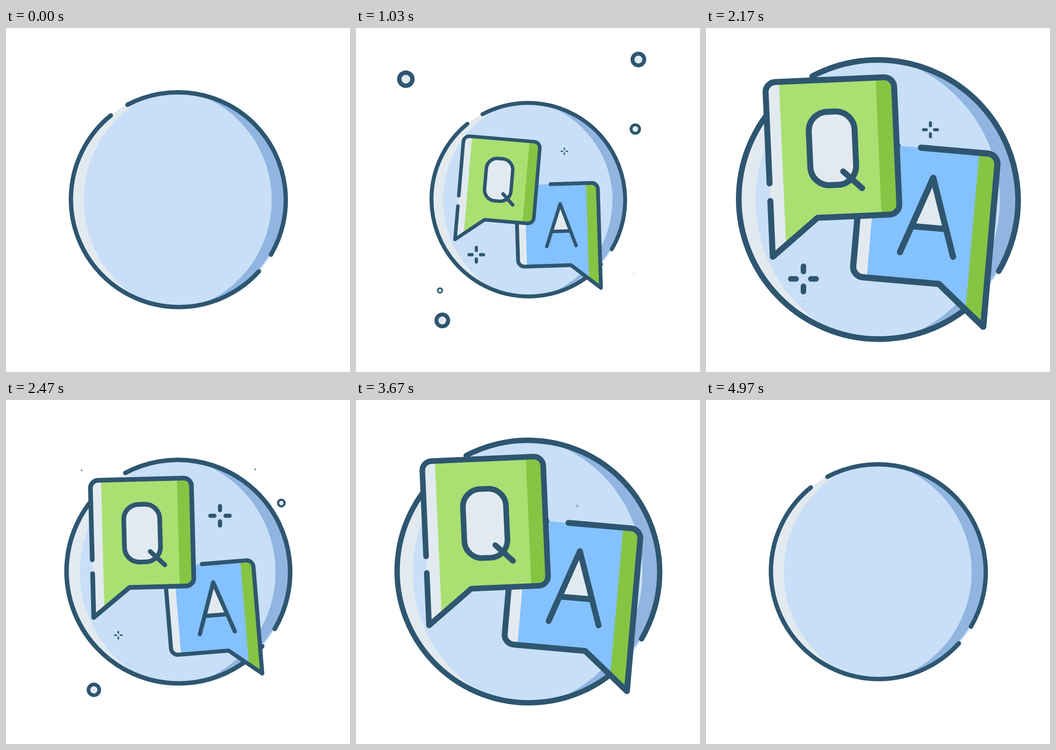
Recreate the animation shown at these times as an HTML page. Size 748x748 px, loop 5 s.

```html
<!DOCTYPE html>
<html lang="en">
<head>
<meta charset="utf-8">
<title>Questions and answers</title>
<style>
  html, body { margin: 0; height: 100%; overflow: hidden; background: #fff; }
  svg { display: block; width: 100vw; height: 100vh; }
  .line { fill: none; stroke: #2e5670; stroke-width: 9.5; stroke-linecap: round; stroke-linejoin: round; }
  .pale { fill: #e2eaf0; }
  .sky { fill: #c8dff7; }
  .shade { fill: #8fb5e0; }
  .blue { fill: #84c1ff; }
  .lime { fill: #a9e071; }
  .green { fill: #86c543; }
</style>
</head>
<body>
<svg viewBox="0 0 748 748">
  <defs>
    <clipPath id="clipQ"><path d="M198 469V207a16 16 0 0 1 16-16H387a16 16 0 0 1 16 16V394a16 16 0 0 1-16 16H272Z"/></clipPath>
    <clipPath id="clipA"><path d="M550 586V339a16 16 0 0 0-16-16H361a16 16 0 0 0-16 16V511a16 16 0 0 0 16 16H477Z"/></clipPath>
    <path id="plus" class="line" style="stroke-width:9.2" d="M12.3 0h8.9M-12.3 0h-8.9M0 12.3v8.9M0-12.3v-8.9"/>
  </defs>

  <g id="scene">
    <circle class="sky" cx="374" cy="374" r="234.5"/>
    <path class="pale" d="M308 149A251.6 251.6 0 0 0 308 599A234.5 234.5 0 0 1 308 149"/>
    <path class="shade" d="M429 149A244.5 244.5 0 0 1 429 599A231.6 231.6 0 0 0 429 149"/>
    <path class="line" d="M264 167A234.5 234.5 0 0 1 576 493M550 529A234.5 234.5 0 1 1 228 190"/>
    <use id="plus1" href="#plus"/>
    <use id="plus2" href="#plus"/>

    <g id="bubbleA">
      <g clip-path="url(#clipA)">
        <rect class="pale" x="340" y="318" width="30" height="270"/>
        <rect class="blue" x="367" y="318" width="156" height="270"/>
        <rect class="green" x="521" y="318" width="34" height="270"/>
      </g>
      <path class="line" d="M396 323H361a16 16 0 0 0-16 16V511a16 16 0 0 0 16 16H477L550 586V339a16 16 0 0 0-16-16H432"/>
      <g id="letterA">
        <path class="pale" d="M455 367L428 443H481Z"/>
        <path class="line" d="M414 484L454.5 367L495 484M428 443H481"/>
      </g>
    </g>

    <g id="bubbleQ">
      <g clip-path="url(#clipQ)">
        <rect class="pale" x="193" y="186" width="30" height="290"/>
        <rect class="lime" x="220" y="186" width="156" height="290"/>
        <rect class="green" x="374" y="186" width="34" height="290"/>
      </g>
      <path class="line" d="M198 352V207a16 16 0 0 1 16-16H387a16 16 0 0 1 16 16V394a16 16 0 0 1-16 16H272L198 469V380"/>
      <g id="letterQ">
        <rect class="pale" x="264" y="242" width="73" height="117" rx="30"/>
        <rect class="line" x="264" y="242" width="73" height="117" rx="30"/>
        <path class="line" d="M316 338L345 366"/>
      </g>
    </g>
  </g>
  <g id="dots"></g>
</svg>

<script>
const LOOP = 5000, FRAME = 100 / 3;
const $ = id => document.getElementById(id);

// Eased 0..1 ramp starting at frame `start`
function ramp(f, start, length) {
  const x = Math.min(1, Math.max(0, (f - start) / length));
  return x * x * (3 - 2 * x);
}

// Rises for 15 frames, then falls for 15
const blink = (f, start) => ramp(f, start, 15) - ramp(f, start + 15, 15);

// Swings 0, 1, -1, 0 in steps of 10 frames
const swing = (f, starts) => starts.reduce((sum, s) =>
  sum + ramp(f, s, 10) - 2 * ramp(f, s + 10, 10) + ramp(f, s + 20, 10), 0);

// Size of a part that pops in with the first swing
const pop = (f, starts) => f < starts[0] + 10
  ? 1.1 * ramp(f, starts[0], 10)
  : 1 + 0.1 * swing(f, starts);

function pose(node, x, y, scale, angle = 0) {
  node.setAttribute("transform",
    `translate(${x} ${y}) rotate(${angle}) scale(${scale}) translate(${-x} ${-y})`);
}

const bubbles = [
  { name: "A", tip: [550, 586], mid: [454.5, 425.5], tilt: 5, starts: [5, 55, 100], end: 130 },
  { name: "Q", tip: [198, 469], mid: [304, 304], tilt: -5, starts: [10, 60, 105], end: 135 },
];

const sparkles = [
  { node: $("plus1"), at: [461.7, 256.5], starts: [7, 57, 107] },
  { node: $("plus2"), at: [249.3, 506], starts: [12, 50, 112] },
];

const dots = [
  { from: [168, 156], to: [76, 87], starts: [16, 71, 113], travel: 25 },
  { from: [538, 155], to: [632, 48], starts: [13, 71, 112], travel: 25 },
  { from: [575, 236], to: [684.5, 181], starts: [22, 66.5, 118], travel: 25 },
  { from: [602.5, 531], to: [662.5, 688], starts: [29, 78, 116], travel: 25 },
  { from: [206, 556], to: [45, 658], starts: [25, 74.5, 119], travel: 25 },
  { from: [213, 594], to: [141, 713], starts: [19, 63, 117], travel: 30 },
];
for (const dot of dots) {
  dot.node = document.createElementNS("http://www.w3.org/2000/svg", "circle");
  dot.node.setAttribute("class", "line");
  dot.node.setAttribute("r", 14.3);
  dot.node.style.fill = "#e2eaf0";
  $("dots").append(dot.node);
}

function draw(f) {
  const beat = f % 50;
  pose($("scene"), 374, 374,
    1 + 0.3 * ramp(beat, 0, 15) - 0.4 * ramp(beat, 15, 15) + 0.1 * ramp(beat, 30, 15));

  for (const { name, tip, mid, tilt, starts, end } of bubbles) {
    const size = pop(f, starts) * (1 - ramp(f, end, 10));
    pose($("bubble" + name), ...tip, size, tilt * swing(f, starts));
    pose($("letter" + name), ...mid, pop(f, [starts[0] + 5]));
  }

  for (const { node, at, starts } of sparkles) {
    const size = starts.reduce((sum, s) => sum + blink(f, s), 0);
    node.setAttribute("transform", `translate(${at}) scale(${size})`);
  }

  for (const { node, from, to, starts, travel } of dots) {
    const start = starts.findLast(s => s <= f) ?? starts[0];
    const p = ramp(f, start, travel);
    const [x, y] = from.map((v, i) => v + (to[i] - v) * p);
    node.setAttribute("transform", `translate(${x} ${y}) scale(${blink(f, start)})`);
  }
}

function tick() {
  // The picture advances 30 times a second
  draw(Math.floor((performance.now() % LOOP + 3.4) / FRAME) % 150);
  requestAnimationFrame(tick);
}
tick();
</script>
</body>
</html>
```
